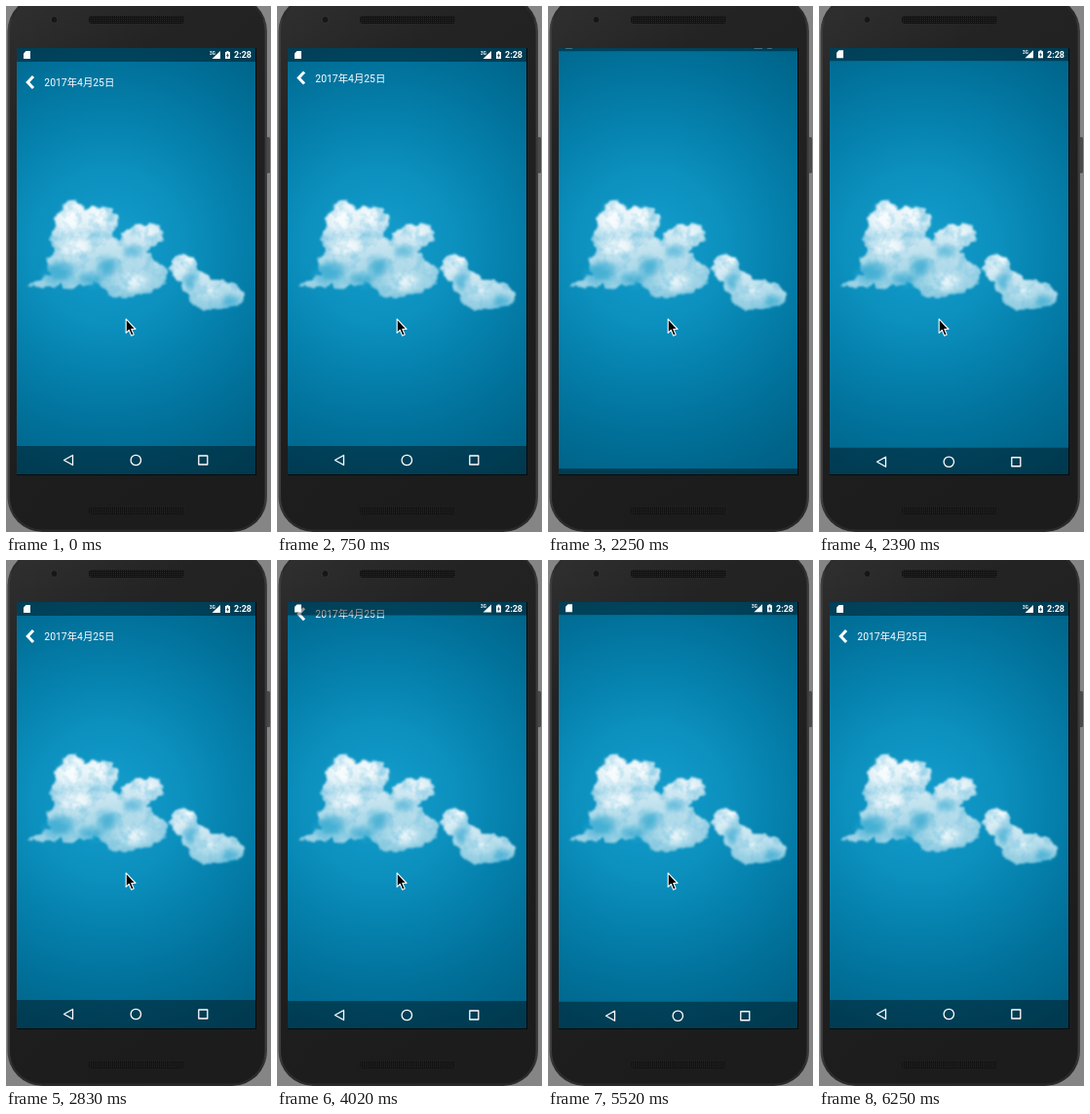
Write an HTML page that moves like this. It is 272 by 538 pixels and loops after 6850 ms.

```html
<!DOCTYPE html>
<html lang="zh">
<head>
<meta charset="utf-8">
<title>Full screen clouds</title>
<style>
  html, body { margin: 0; width: 100%; height: 100%; overflow: hidden; background: #858585; }
  svg { display: block; position: absolute; left: 0; top: 0; }
  text { fill: #fff; font-family: Roboto, "Noto Sans CJK SC", "Noto Sans CJK", sans-serif; }
  .line { fill: none; stroke: #fff; }
</style>
</head>
<body>
<svg width="272" height="538" viewBox="0 0 272 538">
  <defs>
    <radialGradient id="sky" gradientUnits="userSpaceOnUse" cx="105" cy="246" r="280">
      <stop offset="0" stop-color="#149ecd"/>
      <stop offset=".28" stop-color="#0c90be"/>
      <stop offset=".48" stop-color="#0580ac"/>
      <stop offset=".68" stop-color="#01719a"/>
      <stop offset=".84" stop-color="#00668c"/>
      <stop offset="1" stop-color="#005d82"/>
    </radialGradient>
    <linearGradient id="rim" x1="0" x2="1" y1="0" y2="0">
      <stop offset="0" stop-color="#444446"/>
      <stop offset=".02" stop-color="#2b2b2c"/>
      <stop offset=".98" stop-color="#29292a"/>
      <stop offset="1" stop-color="#414143"/>
    </linearGradient>
    <linearGradient id="face" x1="0" x2=".35" y1="0" y2="1">
      <stop offset="0" stop-color="#303031"/>
      <stop offset=".25" stop-color="#232324"/>
      <stop offset="1" stop-color="#1c1c1c"/>
    </linearGradient>
    <linearGradient id="puff" x1="0" x2="0" y1="0" y2="1">
      <stop offset="0" stop-color="#f2f9fc"/>
      <stop offset=".45" stop-color="#c8e5f0"/>
      <stop offset="1" stop-color="#8ccbe1"/>
    </linearGradient>
    <pattern id="mesh" width="2" height="2" patternUnits="userSpaceOnUse">
      <rect width="2" height="2" fill="#111"/>
      <rect width="1" height="1" fill="#2c2c2c"/>
    </pattern>
    <filter id="fluff" x="-10%" y="-10%" width="120%" height="120%" color-interpolation-filters="sRGB">
      <feTurbulence type="fractalNoise" baseFrequency=".15" numOctaves="3" seed="4" result="rough"/>
      <feDisplacementMap in="SourceGraphic" in2="rough" scale="6" xChannelSelector="R" yChannelSelector="G" result="edge"/>
      <feGaussianBlur in="edge" stdDeviation=".8" result="soft"/>
      <feTurbulence type="fractalNoise" baseFrequency=".07" numOctaves="3" seed="9"/>
      <feColorMatrix values="0 0 0 0 .4  0 0 0 0 .74  0 0 0 0 .87  1.5 0 0 0 -.65"/>
      <feComposite in2="soft" operator="in" result="shade"/>
      <feMerge><feMergeNode in="soft"/><feMergeNode in="shade"/></feMerge>
    </filter>
    <filter id="haze" x="-20%" y="-20%" width="140%" height="140%"><feGaussianBlur stdDeviation="3"/></filter>
    <clipPath id="screen"><rect x="11" y="43" width="245" height="436"/></clipPath>
  </defs>

  <!-- phone -->
  <rect width="272" height="538" fill="#858585"/>
  <rect x="267" y="134" width="4" height="37" rx="1.5" fill="#4a4a4b"/>
  <rect x="1.5" y="-10" width="266.5" height="548" rx="36" fill="url(#rim)"/>
  <rect x="4" y="-7.5" width="261.5" height="543" rx="33.5" fill="url(#face)"/>
  <circle cx="49.5" cy="14" r="3.5" fill="#161617" stroke="#39393a" stroke-width=".8"/>
  <rect x="85" y="10" width="98" height="8" rx="3" fill="url(#mesh)"/>
  <rect x="85" y="512" width="98" height="8" rx="3" fill="url(#mesh)"/>
  <rect x="11" y="43" width="246" height="437" fill="#080a0b"/>

  <g clip-path="url(#screen)">
    <rect x="11" y="43" width="245" height="436" fill="url(#sky)"/>

    <g filter="url(#fluff)">
      <path fill="url(#puff)" d="M21 286 Q32 284 37 279 Q42 276 47 275 Q40 264 42 259 Q50 256 49 250 Q44 242 47 234
        Q47 228 52 225 Q49 210 58 208 Q61 197 70 199 Q78 201 81 208 Q89 203 95 207 Q106 203 110 211
        Q116 214 114 222 Q112 231 106 234 Q113 236 118 240 Q116 230 127 228 Q134 220 146 224 Q159 222 160 232
        Q164 241 153 245 Q145 248 144 251 Q150 254 152 261 Q166 264 166 273 Q164 286 153 289 Q146 297 135 295
        Q126 301 117 298 Q104 300 102 290 Q94 284 90 281 Q84 290 75 285 Q64 292 56 285 Q44 290 21 286Z"/>
      <path fill="url(#puff)" d="M166 268 Q173 266 171 260 Q175 253 183 255 Q192 254 195 262 Q194 269 200 271
        Q208 275 209 281 Q220 278 228 283 Q239 284 240 291 Q247 295 244 303 Q237 309 229 306
        Q222 312 212 309 Q202 314 196 307 Q187 305 187 294 Q178 290 181 282 Q172 279 172 272Z"/>
      <g filter="url(#haze)">
        <g fill="#149bc9" opacity=".65">
          <ellipse cx="54" cy="272" rx="15" ry="10"/>
          <ellipse cx="104" cy="267" rx="9" ry="9"/>
          <ellipse cx="130" cy="251" rx="9" ry="4"/>
          <ellipse cx="88" cy="280" rx="12" ry="6"/>
          <ellipse cx="189" cy="281" rx="6" ry="9"/>
          <ellipse cx="230" cy="302" rx="9" ry="5"/>
        </g>
        <g fill="#fff" opacity=".75">
          <ellipse cx="67" cy="217" rx="10" ry="13"/>
          <ellipse cx="94" cy="216" rx="11" ry="6"/>
          <ellipse cx="72" cy="247" rx="14" ry="8"/>
          <ellipse cx="144" cy="233" rx="10" ry="5"/>
          <ellipse cx="130" cy="282" rx="15" ry="8"/>
          <ellipse cx="184" cy="263" rx="5" ry="5"/>
          <ellipse cx="209" cy="293" rx="8" ry="5"/>
        </g>
      </g>
    </g>

    <g id="title">
      <path class="line" stroke-width="3" d="M28 72 L22.3 78 L28 84"/>
      <text x="39.3" y="82.3" font-size="10.4">2017年4月25日</text>
    </g>

    <g id="status">
      <rect x="11" y="43" width="245" height="14" opacity=".4"/>
      <path fill="#fff" d="M20.5 46 H25 V54 H18 V48.5Z"/>
      <text x="209" y="49.5" font-size="4.6" font-weight="700">3G</text>
      <path fill="#fff" d="M220 46 V54 H211.5Z"/>
      <path fill="#fff" d="M226.5 46 H228.5 V47 H230 V54 H225 V47 H226.5Z"/>
      <path fill="#0a4560" d="M228 48 L226 51 H227.2 L227 53 L229 50.2 H227.8Z"/>
      <text x="234" y="53.4" font-size="9" font-weight="700">2:28</text>
    </g>

    <g id="nav">
      <rect x="11" y="450" width="245" height="30" opacity=".4"/>
      <g class="line" stroke-width="1.3" stroke-linejoin="round">
        <path d="M68.5 459.5 V469.5 L59.5 464.5Z"/>
        <circle cx="133.3" cy="464.5" r="5.2"/>
        <rect x="197.8" y="460" width="9" height="9"/>
      </g>
    </g>
  </g>

  <path id="cursor" stroke="#fff" stroke-width="1.1" stroke-linejoin="round"
    d="M123.2 320.2 V334.4 L126.3 331.5 L128.7 337.2 L131.2 336.1 L128.8 330.5 H133Z"/>
</svg>

<script>
  const LOOP = 6850;
  const ticks = [0, 750, 900, 1050, 2250, 2390, 2540, 2680, 2830,
    4020, 4170, 4320, 5520, 5670, 5810, 5960, 6100, 6250];
  // start of each hide and show
  const cycles = [[670, 2223], [3840, 5353]];

  const part = id => document.getElementById(id);
  const title = part('title'), status = part('status'), nav = part('nav'), cursor = part('cursor');
  const progress = (t, start, dur) => Math.min(1, Math.max(0, (t - start) / dur));
  const move = (el, x, y) => el.setAttribute('transform', `translate(${x} ${y.toFixed(2)})`);

  // 0 = in place, 1 = gone; accelerates out, decelerates in
  function hidden(t, dur, outDelay, inDelay) {
    const [out, back] = cycles[t < 3000 ? 0 : 1];
    return t < back + inDelay
      ? progress(t, out + outDelay, dur) ** 2
      : (1 - progress(t, back + inDelay, dur)) ** 2;
  }

  function draw(time) {
    const t = ticks.findLast(tick => tick <= time);
    const bars = hidden(t, 220, 140, 0);
    const head = hidden(t, 250, 0, 283);
    move(title, 0, -44 * head);
    move(status, 0, -14 * bars);
    move(nav, 0, 30 * bars);
    title.style.display = head < 1 ? '' : 'none';
    const away = t >= 6100;
    move(cursor, away ? 110 : 0, away ? 134 : 0);
    cursor.style.display = t < 6250 ? '' : 'none';
  }

  const begin = performance.now();
  function loop() {
    draw((performance.now() - begin) % LOOP);
    requestAnimationFrame(loop);
  }
  loop();
</script>
</body>
</html>
```
